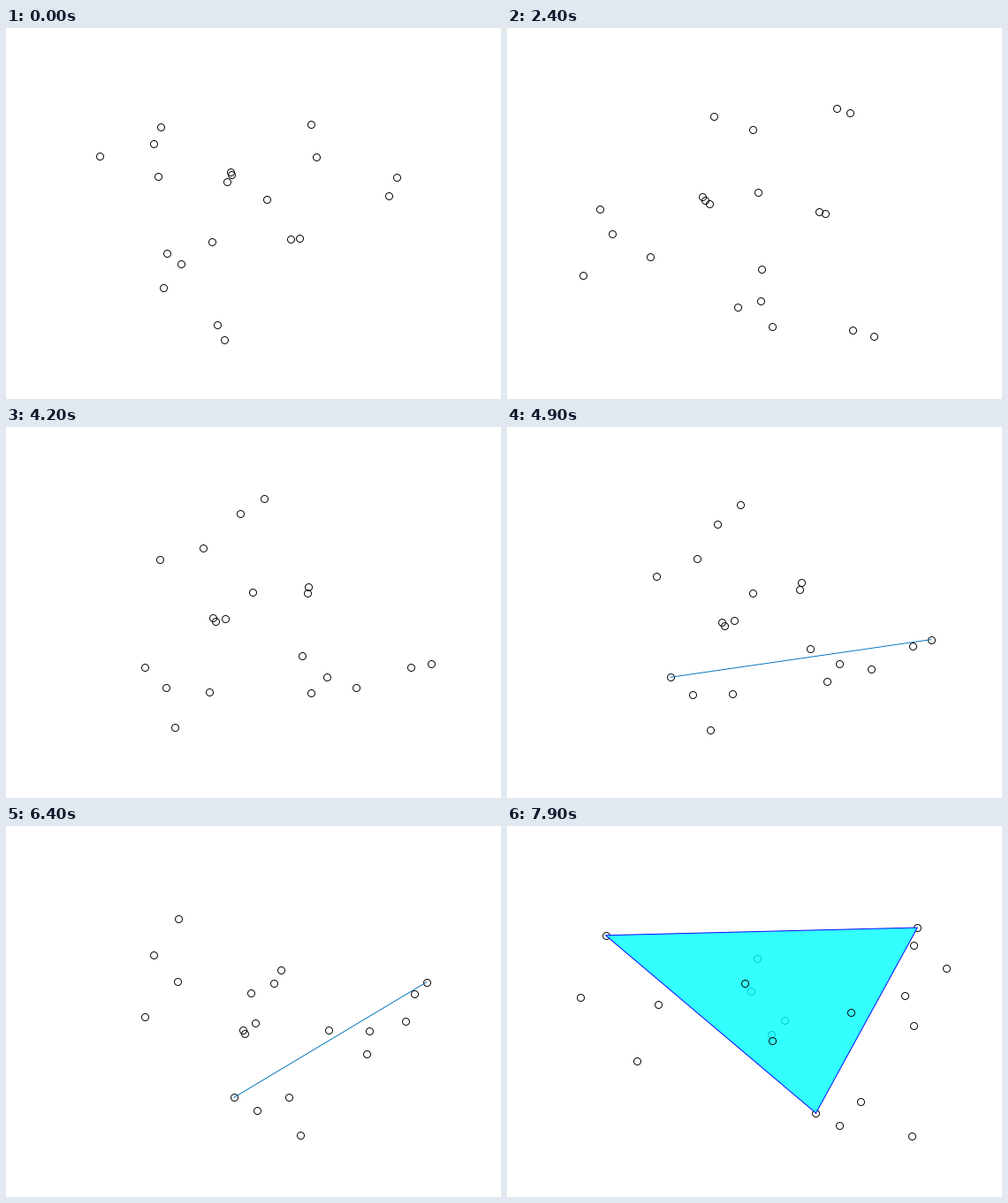
These frames come from a looping animation (560 px wide and 420 px high, 8000 ms). A matplotlib script:

```python
import numpy as np
import matplotlib.pyplot as plt
from matplotlib.animation import FuncAnimation
from matplotlib.patches import Polygon

W, H, FRAMES, STEP_MS = 560, 420, 80, 100
BOX = np.array([0.775 * W, 0.815 * H])    # default axes area
CX, CY = 0.13 * W + BOX[0] / 2, H - 0.11 * H - BOX[1] / 2
SIDE = 434                                # edge of the data cube
LINE_STEP, FACE_STEP = 91, 138
STROKE = 0.68

# The cloud itself, centred on the cube.
CLOUD = np.array([
    (-212, 167, -123), (196, 181, -208), (-214, 57, 49), (79, -180, 196),
    (54, -209, -132), (-103, -147, 10), (-191, 84, -124), (-132, 110, -180),
    (165, 176, -214), (-43, -122, 171), (61, 212, 11), (34, 164, -72),
    (5, 173, -171), (21, 101, -135), (-10, -14, 133), (77, -6, 32),
    (82, -20, -154), (-83, 8, 104), (-79, 9, 46), (-70, 23, 152),
]) / SIDE


def first_face(p):
    """Quickhull start: the two x extremes, then the point farthest from them."""
    a, b = p[:, 0].argmin(), p[:, 0].argmax()
    away = np.linalg.norm(np.cross(p - p[a], p[b] - p[a]), axis=1)
    return [a, b, away.argmax()]


face_ids = first_face(CLOUD)
A, B, C = CLOUD[face_ids]
in_front = (CLOUD - A) @ np.cross(B - A, C - A) > 1e-6


def turn(i):
    """Degrees turned: one per step, two steps a frame, resting at each event."""
    n = 2 * i
    rests = ((0, 1), (LINE_STEP, 3), (FACE_STEP, 3))
    return n - sum(np.clip(n - start, 0, length) for start, length in rests)


def project(deg):
    a = np.radians(deg - 60)
    tilt = np.tan(np.radians(deg / 10))
    c, s = np.cos(a), np.sin(a)
    span = abs(c) + abs(s)                # the cube is stretched to fill the area
    x, y, z = CLOUD.T
    right = (x * c + y * s) / span
    up = (x * s - y * c + tilt * z) / (span + tilt)
    return np.column_stack([CX + BOX[0] * right, CY - BOX[1] * up])


fig = plt.figure(figsize=(W / 100, H / 100), dpi=100, facecolor="white")
ax = fig.add_axes([0, 0, 1, 1])
ax.set_xlim(0, W)
ax.set_ylim(H, 0)
ax.axis("off")


def rings(z):
    return ax.plot([], [], "o", ms=5.76, mfc="none", mec="black",
                   mew=STROKE, zorder=z)[0]


def stroke(color):
    return ax.plot([], [], color=color, lw=STROKE, zorder=3)[0]


back, front = rings(1), rings(4)
edge, rim = stroke("#0072BD"), stroke("blue")
face = Polygon(np.zeros((3, 2)), fc="cyan", ec="none", alpha=0.8, zorder=2)
ax.add_patch(face)


def draw(i):
    pts = project(turn(i))
    corners = pts[face_ids]
    back.set_data(*pts[~in_front].T)
    front.set_data(*pts[in_front].T)
    edge.set_data(*corners[:2].T)
    rim.set_data(*np.vstack([corners, corners[:1]]).T)
    face.set_xy(corners)

    solid = 2 * i > FACE_STEP
    edge.set_visible(2 * i > LINE_STEP + 1 and not solid)
    rim.set_visible(solid)
    face.set_visible(solid)
    return back, front, edge, rim, face


anim = FuncAnimation(fig, draw, frames=FRAMES, interval=STEP_MS,
                     repeat=True, repeat_delay=0, blit=False)
plt.show()
```
